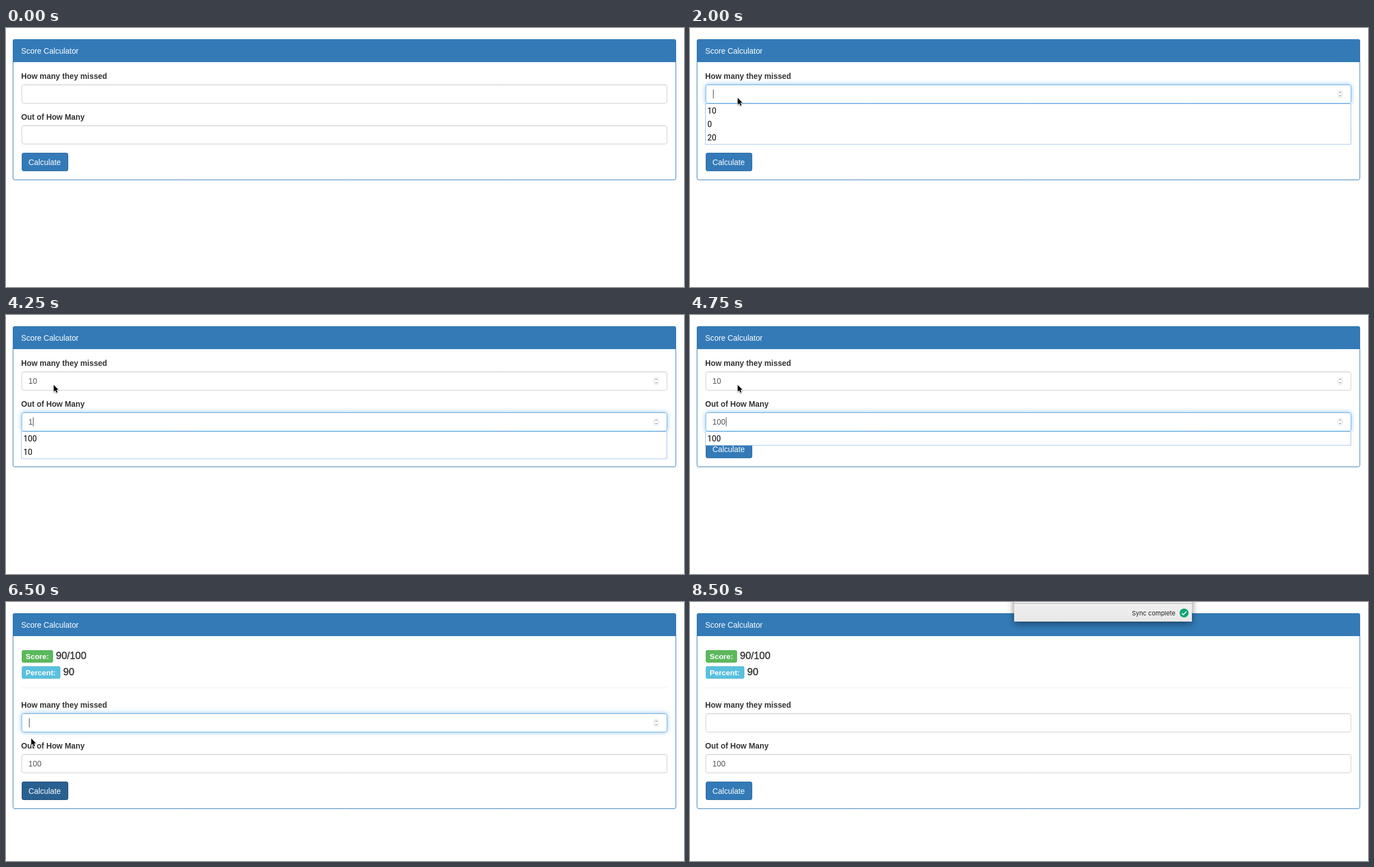
Recreate the animation shown at these times as an HTML page with a canvas. Size 1209 px wide and 463 px high, loop 8.75 s.

```html
<!DOCTYPE html>
<html lang="en">
<head>
<meta charset="utf-8">
<title>Score Calculator</title>
<style>
  html, body { margin: 0; width: 100%; height: 100%; overflow: hidden; background: #fff; }
  canvas { display: block; width: 1209px; height: 463px; }
</style>
</head>
<body>
<canvas id="stage" width="1209" height="463"></canvas>
<script>
const ctx = document.getElementById('stage').getContext('2d');
const LOOP = 8750;
const SANS = '"Liberation Sans", Arial, sans-serif';
const BODY = '13.86px ' + SANS;
const BOLD = 'bold ' + BODY;
const LIST = '14.2px Roboto, sans-serif';

const start = {
  missed: '', total: '', glow1: 0, glow2: 0, spin1: false, spin2: false,
  caret: 0, list1: [], list2: [], button: 'idle', result: false,
  popover: false, pointer: null
};

// Each step changes part of the state from its time on.
const steps = [
  [250, { pointer: [119, 174] }],
  [500, { pointer: [85, 125] }],
  [1000, { glow1: 0.5, spin1: true, caret: 1 }],
  [1250, { glow1: 1 }],
  [1500, { caret: 0, list1: ['10', '0', '20'] }],
  [2000, { caret: 1 }],
  [2500, { caret: 0 }],
  [3000, { caret: 1 }],
  [3500, { missed: '1', list1: ['10'] }],
  [3750, { missed: '10' }],
  [4000, { glow1: 0.4, glow2: 0.6, list1: [], spin2: true, caret: 2 }],
  [4250, { glow1: 0, glow2: 1, total: '1', list2: ['100', '10'] }],
  [4500, { total: '10' }],
  [4750, { total: '100', list2: ['100'] }],
  [5250, { glow2: 0.4, list2: [], spin1: false, spin2: false, caret: 0, button: 'focus', pointer: null }],
  [5500, { glow2: 0 }],
  [6000, { result: true, missed: '', glow1: 0.5, spin1: true, caret: 1, button: 'hover', pointer: [45, 244] }],
  [6250, { glow1: 1 }],
  [6750, { button: 'idle', pointer: [56, 268] }],
  [7000, { caret: 0, pointer: [120, 340] }],
  [7250, { pointer: [210, 372] }],
  [7500, { caret: 1, pointer: [420, 290] }],
  [7750, { pointer: [640, 140] }],
  [8000, { caret: 0, pointer: [760, 24] }],
  [8250, { popover: true, pointer: null, spin1: false, glow1: 0.6 }],
  [8500, { glow1: 0 }]
];

function stateAt(t) {
  const state = { ...start };
  for (const [time, change] of steps) if (t >= time) Object.assign(state, change);
  return state;
}

function text(str, x, y, font, color) {
  ctx.font = font;
  ctx.fillStyle = color;
  ctx.fillText(str, x, y);
}

function box(x, y, w, h, r, fill, stroke) {
  ctx.beginPath();
  ctx.roundRect(x, y, w, h, r);
  if (fill) { ctx.fillStyle = fill; ctx.fill(); }
  if (stroke) { ctx.strokeStyle = stroke; ctx.lineWidth = 1; ctx.stroke(); }
}

function line(color, width, ...points) {
  ctx.beginPath();
  for (const [x, y] of points) ctx.lineTo(x, y);
  ctx.strokeStyle = color;
  ctx.lineWidth = width;
  ctx.stroke();
}

const blend = (a, b, k) => `rgb(${a.map((v, i) => Math.round(v + (b[i] - v) * k))})`;

function spinner(y) {
  box(1155.5, y - 6.5, 8, 13, 4, '#fff', '#dcdcdc');
  for (const d of [-1, 1])
    line('#666', 1, [1157.7, y + d * 2], [1159.5, y + d * 4], [1161.3, y + d * 2]);
}

function field(y, value, glow, spin, caret) {
  ctx.save();
  if (glow) {
    ctx.shadowColor = `rgba(102,175,233,${0.75 * glow})`;
    ctx.shadowBlur = 8;
  }
  box(27.8, y, 1151.2, 34, 4, '#fff');
  ctx.restore();
  box(28.2, y + 0.5, 1150.5, 33, 3.5, '#fff', blend([204, 204, 204], [102, 175, 233], glow));
  line('rgba(0,0,0,.06)', 1, [31, y + 1.5], [1176, y + 1.5]);
  text(value, 40, y + 22, BODY, '#555');
  if (caret) {
    const x = Math.round(40.6 + ctx.measureText(value).width) + 0.5;
    line('#444', 1, [x, y + 9], [x, y + 25]);
  }
  if (spin) spinner(y + 17);
}

function list(y, items) {
  if (!items.length) return;
  box(27.5, y + 0.5, 1151, items.length * 24 + 0.5, 0, '#fff', '#9dc3ea');
  items.forEach((item, i) => text(item, 31, y + 18 + i * 24, LIST, '#000'));
}

function button(look) {
  const idle = look === 'idle';
  if (look === 'focus') box(26, 221, 87, 37, 5, '#8dbcf5');
  box(28, 223, 83, 33, 4, idle ? '#2e6da4' : '#204d74');
  box(29, 224, 81, 31, 3, idle ? '#337ab7' : '#286090');
  text('Calculate', 40, 244.5, BODY, '#fff');
}

function scoreLine(y, label, width, color, value) {
  box(28, y, width, 22.5, 3.4, color);
  text(label, 35, y + 16, 'bold 13.4px ' + SANS, '#fff');
  const x = 28 + width + 5;
  text(value, x, y + 16, '17.8px ' + SANS, '#333');
  ctx.strokeStyle = '#333';
  ctx.lineWidth = 0.45;
  ctx.strokeText(value, x, y + 16);
}

function popover() {
  ctx.save();
  ctx.shadowColor = 'rgba(0,0,0,.5)';
  ctx.shadowBlur = 12;
  ctx.shadowOffsetY = 3;
  box(578, -20, 317, 55, 0, '#ececec');
  ctx.restore();
  const shade = ctx.createLinearGradient(0, 3, 0, 35);
  shade.addColorStop(0, '#f0f0f0');
  shade.addColorStop(1, '#e8e8e8');
  box(578, 3, 317, 32, 0, shade);
  box(578, 0, 317, 2, 0, '#f6f6f6');
  line('#aaa', 1, [578, 2.5], [895, 2.5]);
  text('Sync complete', 788, 24, '11px Inter, sans-serif', '#222');
  ctx.beginPath();
  ctx.arc(881, 19.7, 8, 0, Math.PI * 2);
  ctx.fillStyle = '#12a670';
  ctx.fill();
  line('#fff', 1.7, [877, 20], [879.8, 22.8], [885.2, 17]);
}

function pointer(x, y) {
  ctx.save();
  ctx.translate(x, y);
  ctx.beginPath();
  for (const p of [[0, 0], [0, 12], [2.8, 9.5], [4.8, 14], [6.8, 13.1], [4.9, 8.7], [8.5, 8.6]])
    ctx.lineTo(...p);
  ctx.closePath();
  ctx.lineJoin = 'round';
  ctx.strokeStyle = '#fff';
  ctx.lineWidth = 2;
  ctx.shadowColor = 'rgba(0,0,0,.35)';
  ctx.shadowBlur = 2;
  ctx.shadowOffsetY = 1;
  ctx.stroke();
  ctx.shadowColor = 'transparent';
  ctx.fillStyle = '#000';
  ctx.fill();
  ctx.restore();
}

function draw(s) {
  const shift = s.result ? 98 : 0;
  ctx.fillStyle = '#fff';
  ctx.fillRect(0, 0, 1209, 463);

  box(12.5, 20.5, 1182, 251 + shift, 3.5, '#fff', '#337ab7');
  box(12, 20, 1183, 41, [4, 4, 0, 0], '#337ab7');
  text('Score Calculator', 27, 45.5, BODY, '#fff');

  if (s.result) {
    scoreLine(86, 'Score:', 56, '#5cb85c', '90/100');
    scoreLine(114.7, 'Percent:', 69, '#5bc0de', '90');
    line('#eee', 1, [27.5, 153.5], [1179, 153.5]);
  }

  ctx.save();
  ctx.translate(0, shift);
  text('How many they missed', 27, 91, BOLD, '#333');
  text('Out of How Many', 27, 164, BOLD, '#333');
  field(101, s.missed, s.glow1, s.spin1, s.caret === 1);
  field(174, s.total, s.glow2, s.spin2, s.caret === 2);
  button(s.button);
  list(135, s.list1);
  list(208, s.list2);
  ctx.restore();

  if (s.popover) popover();
  if (s.pointer) pointer(...s.pointer);
}

function tick() {
  draw(stateAt(performance.now() % LOOP));
  requestAnimationFrame(tick);
}
tick();
</script>
</body>
</html>
```
